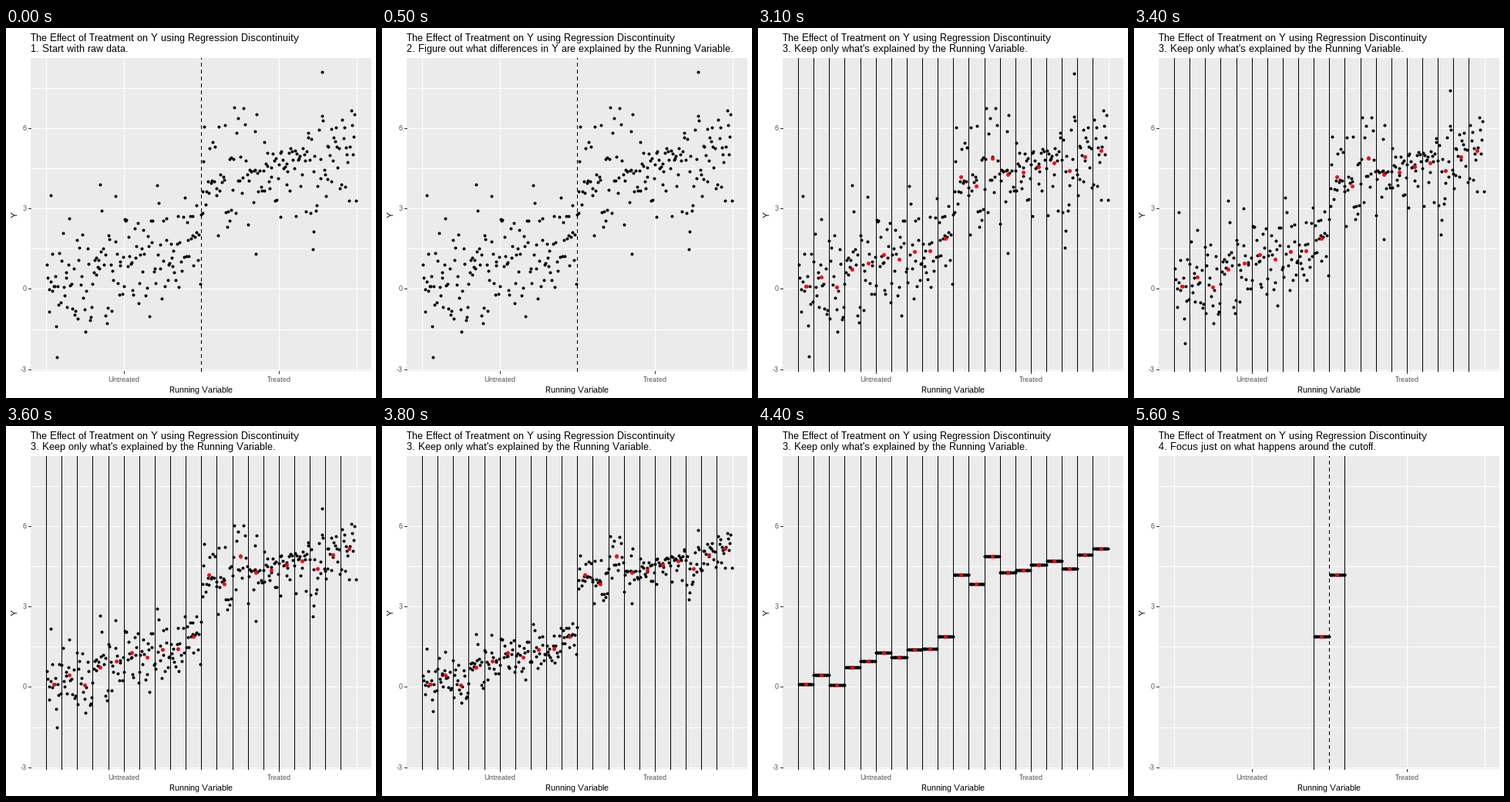
A matplotlib script that plays this animation: 480 px wide and 480 px high, repeating every 8000 ms.

```python
import numpy as np
import matplotlib.pyplot as plt
from matplotlib.animation import FuncAnimation
from matplotlib.patches import Rectangle

SIZE, DPI = 480, 72
LEFT, RIGHT, TOP, BOTTOM = 32, 474, 39, 445
BINS, CUTOFF_BIN, POINTS, SPREAD = 20, 10, 310, 1.1

# Average outcome in each bin of the running variable.
MEANS = np.array([0.08, 0.42, 0.04, 0.71, 0.93, 1.25, 1.08, 1.37, 1.39, 1.86,
                  4.16, 3.82, 4.85, 4.25, 4.34, 4.53, 4.67, 4.39, 4.91, 5.14])
EXTREMES = [(-0.97, 3.47), (-0.93, -2.57), (-0.65, 3.87),
            (0.35, 1.28), (0.72, 1.46), (0.78, 8.08)]

STEPS = [
    (0, "1. Start with raw data."),
    (5, "2. Figure out what differences in Y are explained by the Running Variable."),
    (31, "3. Keep only what's explained by the Running Variable."),
    (56, "4. Focus just on what happens around the cutoff."),
]
BINS_FROM, SHRINK_FROM, SHRINK_STEPS, FOCUS_FROM = 10, 30, 14, 56


def x_at(running):
    return np.round(253.3 + 201.3 * running)


def y_at(value):
    return np.round(337.45 - 34.72 * value)


def make_points():
    """Even spread along x, normal noise around each bin's mean, a few extremes."""
    rng = np.random.default_rng(7)
    x = (np.arange(POINTS) + rng.random(POINTS)) / POINTS * 2 - 1
    y = rng.normal(0, SPREAD, POINTS).clip(-2.4, 2.4)
    group = bin_of(x)
    for b in range(BINS):
        y[group == b] += MEANS[b] - y[group == b].mean()
    return np.vstack([np.column_stack([x, y]), EXTREMES]).T


def bin_of(x):
    return ((x + 1) * BINS / 2).astype(int)


bins = np.arange(BINS)
edges = -1 + bins * 2 / BINS
centres = edges + 1 / BINS
raw_x, raw_y = make_points()
group = bin_of(raw_x)

plt.rcParams.update({"font.family": "Liberation Sans",
                     "text.hinting": "native", "text.hinting_factor": 1})
fig = plt.figure(figsize=(SIZE / DPI, SIZE / DPI), dpi=DPI, facecolor="white")
ax = fig.add_axes([0, 0, 1, 1])
ax.set_xlim(0, SIZE)
ax.set_ylim(SIZE, 0)
ax.axis("off")


def line(x, y, color, **style):
    return ax.plot(x, y, color=color, lw=1, antialiased=False,
                   solid_capstyle="butt", dash_capstyle="butt", **style)[0]


def vline(x, color="black", y0=BOTTOM, y1=TOP, **style):
    return line([x, x], [y0, y1], color, **style)


def hline(y, color, x0=LEFT, x1=RIGHT):
    # Strokes snap upwards, so start from the lower edge of the pixel row.
    return line([x0, x1], [y + 1, y + 1], color)


def label(x, y, text, size, color="black", ha="center", **style):
    return ax.text(x, y, text, fontsize=size, color=color, ha=ha,
                   va=style.pop("va", "baseline"), **style)


def dots(color, size, z):
    return ax.plot([], [], "o", color=color, ms=size, mew=0, zorder=z)[0]


ax.add_patch(Rectangle((LEFT, TOP), RIGHT - LEFT, BOTTOM - TOP,
                       fc="#EBEBEB", lw=0, antialiased=False))
for x in x_at(np.linspace(-1, 1, 5)):
    vline(x, "white")
for y in y_at(np.arange(-3, 8, 1.5)):
    hline(y, "white")

for running, name in ((-0.5, "Untreated"), (0.5, "Treated")):
    vline(x_at(running), "#333333", BOTTOM + 3, BOTTOM)
    label(x_at(running), 459, name, 9, "#4D4D4D")
for value in (-3, 0, 3, 6):
    hline(y_at(value), "#333333", LEFT - 3, LEFT)
    label(27, y_at(value) + 4, str(value), 9, "#4D4D4D", ha="right")
label(253, 473, "Running Variable", 11)
label(12, 242, "Y", 11, rotation=90, va="center")
label(32, 17, "The Effect of Treatment on Y using Regression Discontinuity",
      13, ha="left")
caption = label(32, 31, "", 13, ha="left")

cutoff_line = vline(x_at(0), linestyle=(0, (4, 4)), zorder=3)
bin_lines = [vline(x_at(edge), zorder=3) for edge in edges]
data_dots = dots("black", 4, 4)
mean_dots = dots("red", 5, 5)


def draw(i):
    binned, focused = i >= BINS_FROM, i >= FOCUS_FROM
    caption.set_text([text for start, text in STEPS if i >= start][-1])

    progress = np.clip((i - SHRINK_FROM) / SHRINK_STEPS, 0, 1)
    ease = (1 - np.cos(np.pi * progress)) / 2
    beside_cutoff = (bins == CUTOFF_BIN - 1) | (bins == CUTOFF_BIN)
    shown = beside_cutoff | (not focused)
    keep = shown[group]
    y = raw_y + (MEANS[group] - raw_y) * ease
    data_dots.set_data(x_at(raw_x[keep]), y_at(y[keep]))
    mean_dots.set_data(x_at(centres[shown]), y_at(MEANS[shown]))
    mean_dots.set_visible(binned)

    cutoff_line.set_visible(not binned or focused)
    for b, edge in enumerate(bin_lines):
        edge.set_visible(binned and (not focused or abs(b - CUTOFF_BIN) == 1))
    return [caption, data_dots, mean_dots, cutoff_line, *bin_lines]


anim = FuncAnimation(fig, draw, frames=80, interval=100, repeat=True)
plt.show()
```
